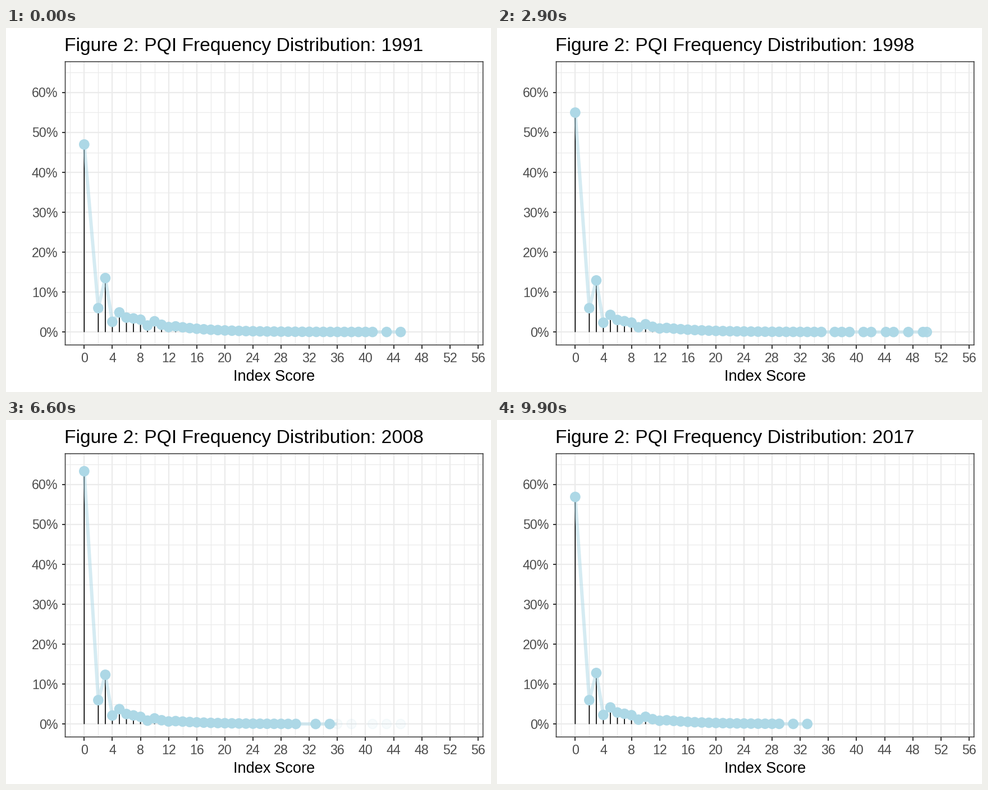
A matplotlib script that plays this animation: 864x648 px, repeating every 10000 ms.

```python
import matplotlib.pyplot as plt
import numpy as np
from matplotlib.animation import FuncAnimation
from matplotlib.collections import LineCollection
from matplotlib.colors import to_rgba

W, H, DPI = 864, 648, 100
FRAMES, START, SPAN = 100, 1991, 26
PX = 72 / DPI
BLUE, INK, GRID, GREY = "#ADD8E6", "#333333", "#EBEBEB", "#4D4D4D"
PEAK = 64.5

plt.rcParams["font.family"] = "Liberation Sans"

# Per survey: share of score 0, end of the unbroken run, sparse scores, top score
SURVEYS = {
    1991: (47.0, 41, 2, 45),
    1993: (48.9, 37, 8, 54),
    1996: (51.8, 37, 7, 54),
    1999: (55.3, 30, 15, 50),
    2002: (53.8, 33, 4, 46),
    2005: (57.4, 34, 2, 40),
    2008: (PEAK, 30, 2, 35),
    2011: (51.7, 29, 8, 45),
    2014: (54.3, 29, 5, 36),
    2017: (56.9, 29, 2, 33),
}
HEAD = [6.0, 13.6, 2.6, 5.0, 3.7, 3.5, 3.2, 1.7, 2.8, 1.9, 1.3]  # scores 2..12


def survey(zero, last, count, end):
    """Scores and percentages; a larger zero share thins the high scores."""
    gaps = (np.arange(1, count + 1) / count) ** 1.3
    tail = np.ceil(last + (end - last) * gaps)
    x = np.concatenate([[0], np.arange(2, last + 1), tail])
    y = 1.45 * np.exp((13 - x) / 5.5) + 0.03
    y[1:len(HEAD) + 1] = HEAD
    weight = np.exp(-0.04 * (zero - 46.2))
    y *= weight ** np.clip(0.14 * (x - 2), 0, 1)
    y[0] = zero
    return x, y


DATA = [survey(*row) for row in SURVEYS.values()]
KEYS = [round((FRAMES - 1) * (year - START) / SPAN) for year in SURVEYS]


def pad(a, n, fill):
    return np.concatenate([a, fill[len(a):n]])


def hold(a, n):
    return np.concatenate([a, np.full(n - len(a), a[-1])])


def state(i):
    """Points, their opacity and the line at frame i."""
    k = min(np.searchsorted(KEYS, i, side="right") - 1, len(KEYS) - 2)
    t = (i - KEYS[k]) / (KEYS[k + 1] - KEYS[k])
    a, b = DATA[k], DATA[k + 1]
    na, nb = len(a[0]), len(b[0])
    n = max(na, nb)

    def mix(p, q):
        return p + (q - p) * t

    points = [mix(pad(p, n, q), pad(q, n, p)) for p, q in zip(a, b)]
    line = [mix(hold(p, n), hold(q, n)) for p, q in zip(a, b)]
    row = np.arange(n)
    alpha = mix((row < na) * 1.0, (row < nb) * 1.0)
    return points, alpha, line


fig = plt.figure(figsize=(W / DPI, H / DPI), dpi=DPI, facecolor="white")
left, right, top, bottom = 105.5, 849.7, 60, 564.3
ax = fig.add_axes([left / W, 1 - bottom / H, (right - left) / W, (bottom - top) / H])
ax.set_xlim(-2.7, 56.7)
ax.set_ylim(-0.05 * PEAK, 1.05 * PEAK)
ax.set_xticks(range(0, 57, 4), labels=[])
ax.set_yticks(range(0, 61, 10), labels=[])
ax.set_xticks(range(-2, 55, 4), minor=True)
ax.set_yticks(range(5, 66, 10), minor=True)
ax.set_axisbelow(True)
ax.grid(which="major", color=GRID, lw=2.3 * PX)
ax.grid(which="minor", color=GRID, lw=1.2 * PX)
ax.tick_params(which="major", length=6.5 * PX, width=2 * PX, color=INK)
ax.tick_params(which="minor", length=0)
for spine in ax.spines.values():
    spine.set(color=INK, linewidth=1.5 * PX, snap=False)


def label(x, y, text, size, color="black", ha="center"):
    return fig.text(x / W, 1 - y / H, text, fontsize=size * PX, color=color,
                    ha=ha, va="baseline")


def to_px(u, v):
    x, y = ax.transData.transform((u, v))
    return x, H - y


for u in range(0, 57, 4):
    label(to_px(u, 0)[0], 595, str(u), 23.2, GREY)
for v in range(0, 61, 10):
    label(92.5, to_px(0, v)[1] + 8.5, f"{v}%", 23.2, GREY, "right")
label(477.5, 628, "Index Score", 27.3)
title = label(104.5, 40.5, "", 33.6, ha="left")

stems = LineCollection([], linewidths=1.7 * PX, zorder=3, snap=False)
ax.add_collection(stems)
curve, = ax.plot([], [], color=BLUE, alpha=0.5, lw=6 * PX, zorder=4,
                 solid_capstyle="butt", solid_joinstyle="round")
dots = ax.scatter([], [], s=(16.8 * PX) ** 2, linewidths=1.9 * PX, zorder=5)


def tint(color, alpha):
    rgba = np.tile(to_rgba(color), (len(alpha), 1))
    rgba[:, 3] = alpha
    return rgba


def draw(i):
    (x, y), alpha, line = state(i)
    stems.set_segments([[(u, 0), (u, v)] for u, v in zip(x, y)])
    stems.set_color(tint("black", alpha))
    curve.set_data(*line)
    dots.set_offsets(np.column_stack([x, y]))
    dots.set_facecolor(tint(BLUE, alpha))
    dots.set_edgecolor(tint(BLUE, alpha))
    year = START + SPAN * i // (FRAMES - 1)
    title.set_text(f"Figure 2: PQI Frequency Distribution: {year}")
    return stems, curve, dots, title


anim = FuncAnimation(fig, draw, frames=FRAMES, interval=100, repeat=True,
                     repeat_delay=0, blit=False)
plt.show()
```
